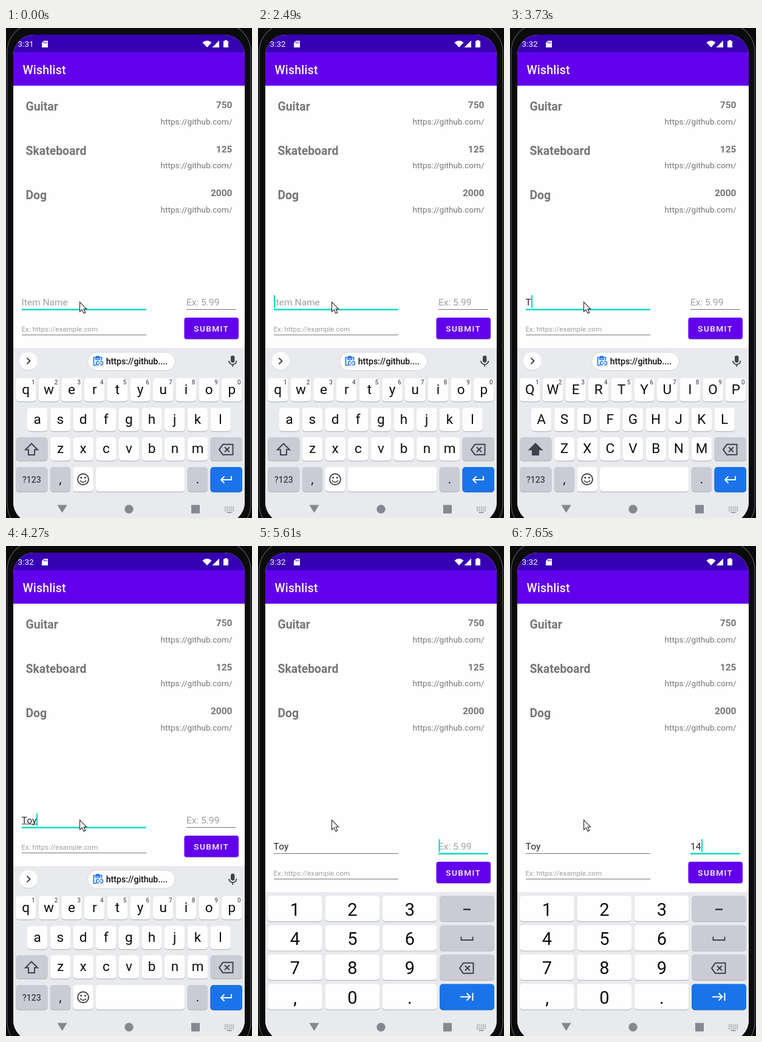
These frames come from a looping animation (405x807 px, 8 s). An HTML page:

```html
<!DOCTYPE html>
<html lang="en">
<head>
<meta charset="utf-8">
<title>Wishlist</title>
<style>
html, body { margin: 0; width: 100%; height: 100%; overflow: hidden; background: #0b0b0c; }
svg { display: block; width: 405px; height: 807px; font-family: Roboto, sans-serif; }
text { white-space: pre; }
</style>
</head>
<body>
<svg id="stage" viewBox="0 0 405 807" xmlns="http://www.w3.org/2000/svg">
  <defs>
    <clipPath id="screen"><rect x="12" y="11" width="381" height="804" rx="34"/></clipPath>
  </defs>
  <rect width="405" height="807" fill="#0b0b0c"/>
  <rect x="2" y="-8" width="401" height="840" rx="48" fill="none" stroke="#48484a" stroke-width="1.5"/>
  <g clip-path="url(#screen)">
    <rect x="12" y="11" width="381" height="804" fill="#fefefe"/>
    <rect x="12" y="40" width="381" height="55" fill="#6200ee"/>
    <rect x="12" y="11" width="381" height="29" fill="#3700b3"/>
    <g id="list"></g>
    <g id="form"></g>
    <g id="letters"></g>
    <g id="numbers"></g>
    <g fill="#85888c">
      <path d="M84.500 785.500H100.500L92.500 798.500Z"/>
      <circle cx="202.500" cy="792.500" r="7.200"/>
      <rect x="305" y="785.500" width="14" height="14"/>
      <path d="M360 789h15M360 792h15M360 795h15" fill="none" stroke="#85888c" stroke-width="1.700" stroke-dasharray="1.700 1.600"/>
      <path d="M363.500 798h8" stroke="#85888c" stroke-width="1.500"/>
    </g>
  </g>
  <g id="status" fill="#fff">
    <path d="M62.500 21H69V32H59V24.500Z"/>
    <path d="M62.500 22.500v3M64.700 22.500v3M66.900 22.500v3" stroke="#3700b3"/>
    <path d="M323.500 24Q331 17.500 338.500 24L331 32Z"/>
    <path d="M351 20.500V32H339.500Z"/>
    <path d="M360 20h4v1.500h2V32h-8V21.500h2Z"/>
  </g>
  <path d="M121.500 451.300V467.300L125.200 463.800L128 469.800L130.800 468.600L128.100 462.700H132.600Z" fill="#fff" stroke="#222" stroke-width="1.100"/>
</svg>
<script>
const NS = 'http://www.w3.org/2000/svg';
const $ = id => document.getElementById(id);

function add(parent, tag, attrs, text) {
  const el = document.createElementNS(NS, tag);
  for (const k in attrs) el.setAttribute(k, attrs[k]);
  if (text !== undefined) el.textContent = text;
  parent.appendChild(el);
  return el;
}
const label = (parent, text, x, y, size, fill, more) =>
  add(parent, 'text', { x, y, 'font-size': size, fill, ...more }, text);
const box = (parent, x, y, width, height, fill, rx = 0) =>
  add(parent, 'rect', { x, y, width, height, fill, rx });
const stroke = (parent, d, color, width = 2, fill = 'none') =>
  add(parent, 'path', { d, fill, stroke: color, 'stroke-width': width });
const show = (el, on) => el.setAttribute('visibility', on ? 'inherit' : 'hidden');

const MEDIUM = { 'font-weight': 500 }, BOLD = { 'font-weight': 700 };
const MID = { 'text-anchor': 'middle' }, END = { 'text-anchor': 'end' };
const GREY = '#757575', HINT = '#9f9f9f', INK = '#212121', TEAL = '#03dac5';
const BOARD = '#e8eaed', KEY = '#fefefe', SIDE = '#caccd3', BLUE = '#1a73e8', ICON = '#3f4246';

// Header and list
const clock = label($('status'), '', 19.5, 31.3, 13.58, '#fff');
label($('list'), 'Wishlist', 27.5, 75.6, 19.4, '#fff', { ...MEDIUM, 'letter-spacing': '.0125em' });
[['Guitar', 750], ['Skateboard', 125], ['Dog', 2000]].forEach(([name, price], i) => {
  const y = 136 + i * 72.8;
  label($('list'), name, 32.5, y, 19.4, GREY, BOLD);
  label($('list'), price, 372.5, y - 4.2, 15.52, GREY, { ...BOLD, ...END });
  label($('list'), 'https://github.com/', 372.5, y + 22.5, 13.58, GREY, END);
});

// Form
const form = $('form');
const itemHint = label(form, 'Item Name', 25.5, 456.8, 15.52, HINT);
const itemText = label(form, '', 25.5, 456.8, 15.52, INK, { 'letter-spacing': '.009em' });
const composing = box(form, 26, 457.5, 0, 1, '#333');
const itemLine = box(form, 26, 463, 205, 1, GREY);
const costHint = label(form, 'Ex: 5.99', 297, 456.8, 15.52, HINT);
const costText = label(form, '', 297, 456.8, 15.52, INK, { 'letter-spacing': '.009em' });
const costLine = box(form, 297, 463, 82, 1, GREY);
label(form, 'Ex: https://example.com', 25.5, 500.2, 11.64, HINT);
box(form, 26, 505, 205, 1, GREY);
const caret = box(form, 26, 440, 2, 21, TEAL);
box(form, 293.5, 478.5, 89.5, 35, 'rgba(0,0,0,.22)', 4);
box(form, 293.5, 477, 89.5, 35.3, '#6200ee', 4);
label(form, 'SUBMIT', 309.3, 500, 13.58, '#fff', { ...MEDIUM, 'letter-spacing': 1.4 });

function key(parent, x, y, w, h, fill = KEY) {
  box(parent, x, y + 1.2, w, h, fill === BLUE ? '#1765cc' : '#b6b8bc', 5);
  box(parent, x, y, w, h, fill, 5);
}
function backspace(parent, x, y) {
  stroke(parent, `M${x - 11.5} ${y}l6 -8.500H${x + 11}v17H${x - 5.5}Z`, ICON).setAttribute('stroke-linejoin', 'round');
  stroke(parent, `M${x - 2.5} ${y - 4}l8 8m0 -8l-8 8`, ICON);
}

// Letter keyboard
const abc = $('letters');
box(abc, 12, 527, 381, 290, BOARD);
add(abc, 'circle', { cx: 37, cy: 549.6, r: 15, fill: '#c4c6ca' });
add(abc, 'circle', { cx: 37, cy: 548.7, r: 15, fill: KEY });
stroke(abc, 'M34.500 543.500l5 5l-5 5', ICON);
add(abc, 'rect', { x: 134.5, y: 534, width: 144, height: 30, rx: 15, fill: KEY, stroke: '#d3d5d9' });
stroke(abc, 'M149 555.500H144.500V542.500H157.500V547M148 542.500v3.500h6v-3.500', BLUE, 1.7);
box(abc, 148, 540, 6, 4, BLUE, 1.5);
stroke(abc, 'M153 549h-1.500a3 3 0 0 0 0 6h1.500M155 549h1.500a3 3 0 0 1 0 6h-1.500M152 552h4', BLUE, 1.5);
label(abc, 'https://github....', 164.8, 554.3, 14.1, '#111', MEDIUM);
box(abc, 370, 539.5, 6.4, 11.5, ICON, 3.2);
stroke(abc, 'M367 548a6.200 6.200 0 0 0 12.400 0M373.200 554v4', ICON, 1.8);

const caps = [];
const PITCH = 37.67, KW = 33.4;
[['qwertyuiop', 16, 576.5], ['asdfghjkl', 35, 625.5], ['zxcvbnm', 72.8, 674]].forEach(([row, x0, y], r) => {
  [...row].forEach((ch, i) => {
    const x = x0 + i * PITCH;
    key(abc, x, y, KW, 38.5);
    caps.push(label(abc, ch, x + KW / 2, y + 26, 22.5, '#0c0c0c', MID));
    if (!r) label(abc, (i + 1) % 10, x + 28.8, y + 10.7, 10, '#5a5d61', { ...MID, ...MEDIUM });
  });
});
key(abc, 16, 674, 52.5, 38.5, SIDE);
const shift = stroke(abc, 'M42 684.500L52 694.500H47V703H37V694.500H32Z', ICON);
key(abc, 336.5, 674, 52.5, 38.5, SIDE);
backspace(abc, 362.5, 694.3);
key(abc, 16, 723, 52.5, 40.5, SIDE);
label(abc, '?123', 42.3, 748.7, 14, ICON, { ...MID, ...MEDIUM });
key(abc, 72.8, 723, KW, 40.5, SIDE);
label(abc, ',', 89.5, 750.2, 22, '#222', MID);
key(abc, 110.4, 723, KW, 40.5);
add(abc, 'circle', { cx: 127, cy: 743.2, r: 9, fill: 'none', stroke: ICON, 'stroke-width': 1.9 });
for (const cx of [123.7, 130.3]) add(abc, 'circle', { cx, cy: 740.5, r: 1.5, fill: ICON });
stroke(abc, 'M122 745.200q5 6 10 0', ICON, 1.7);
key(abc, 148, 723, 146.3, 40.5);
key(abc, 298.7, 723, KW, 40.5, SIDE);
label(abc, '.', 315.4, 750.2, 22, '#222', MID);
key(abc, 336.5, 723, 52.5, 40.5, BLUE);
stroke(abc, 'M371 738V744H354M359.500 738.500L354 744L359.500 749.500', '#fff');

// Number pad
const pad = $('numbers');
box(pad, 12, 570, 381, 247, BOARD);
['123-', '456_', '789<', ',0.>'].forEach((row, r) => {
  const y = 576 + r * 48.4;
  [...row].forEach((ch, c) => {
    const x = 16 + c * 94.4;
    key(pad, x, y, 89.7, 42, c < 3 ? KEY : r < 3 ? SIDE : BLUE);
    if (c < 3) label(pad, ch, x + 45, y + 32.5, 29, '#0c0c0c', MID);
  });
});
stroke(pad, 'M338 598.500h12', '#222', 2.2);
stroke(pad, 'M334.500 643.500v5.500h19v-5.500', ICON);
backspace(pad, 343.5, 695.3);
stroke(pad, 'M333 742.500h16M343.500 736.500l6 6l-6 6M353.500 736v13', '#fff');

// Each step: start ms, then the values that change
const steps = [
  [0, { time: '3:31', item: '', cost: '', under: 0, upper: false, pad: false, x: 26, on: false }],
  [510, { on: true }],
  [880, { time: '3:32' }],
  [1030, { on: false }],
  [1560, { on: true }],
  [1960, { on: false }],
  [2490, { on: true }],
  [3020, { on: false }],
  [3450, { on: true }],
  [3730, { item: 'T', upper: true, x: 35 }],
  [3880, { upper: false, under: 9 }],
  [4000, { item: 'To', x: 43 }],
  [4120, { item: 'Toy', x: 50, under: 17 }],
  [4270, { under: 25 }],
  [4850, { on: false }],
  [5360, { on: true }],
  [5610, { pad: true, under: 0, x: 297.5 }],
  [6140, { on: false }],
  [6710, { on: true }],
  [7120, { on: false }],
  [7370, { cost: '1', x: 306, on: true }],
  [7650, { cost: '14', x: 315 }]
];

function focusLine(el, on) {
  el.setAttribute('fill', on ? TEAL : GREY);
  el.setAttribute('y', on ? 462.5 : 463);
  el.setAttribute('height', on ? 2.5 : 1);
}

function draw(s) {
  clock.textContent = s.time;
  form.setAttribute('transform', `translate(0 ${s.pad ? 43 : 0})`);
  itemText.textContent = s.item;
  costText.textContent = s.cost;
  show(itemHint, !s.item);
  show(costHint, !s.cost);
  composing.setAttribute('width', s.under);
  focusLine(itemLine, !s.pad);
  focusLine(costLine, s.pad);
  caret.setAttribute('x', s.x);
  show(caret, s.on);
  show(abc, !s.pad);
  show(pad, s.pad);
  shift.setAttribute('fill', s.upper ? ICON : 'none');
  for (const cap of caps) {
    cap.textContent = s.upper ? cap.textContent.toUpperCase() : cap.textContent.toLowerCase();
  }
}

const LOOP = 8000, start = performance.now();
let last = -1;
function tick() {
  const t = (performance.now() - start) % LOOP;
  const n = steps.filter(([at]) => at <= t).length;
  if (n !== last) draw(Object.assign({}, ...steps.slice(0, n).map(([, v]) => v)));
  last = n;
  requestAnimationFrame(tick);
}
tick();
</script>
</body>
</html>
```
